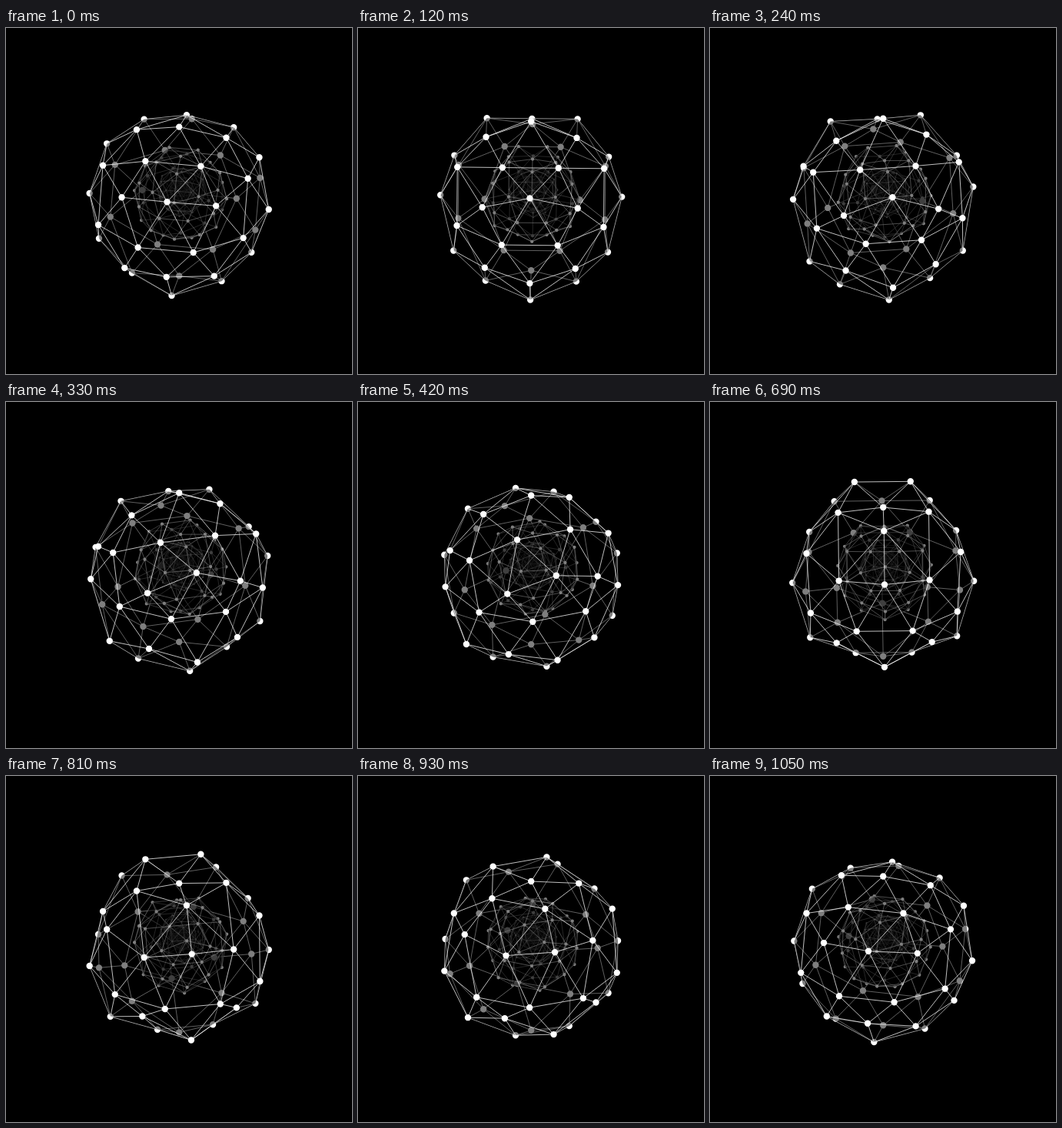
Recreate the animation shown at these times as an HTML page with a canvas. Size 450x450 px, loop 1.08 s.

```html
<!DOCTYPE html>
<html lang="en">
<head>
<meta charset="utf-8">
<title>Nested geodesic spheres</title>
<style>
  html, body { margin: 0; width: 100%; height: 100%; overflow: hidden; background: #000; }
  canvas { display: block; width: 450px; height: 450px; }
</style>
</head>
<body>
<canvas id="stage" width="450" height="450"></canvas>
<script>
const ctx = document.getElementById('stage').getContext('2d');
const LOOP = 1080, STEP = 30, LEVELS = 6, RATIO = 0.515;
const RADIUS = 118, TILT = 34.8 * Math.PI / 180;
const CENTER = { x: 225.2, y: 225.5 }, VANISH = { x: 229.1, y: 207.5 };
const FRONT_DEPTH = 0.1;
const rad = deg => deg * Math.PI / 180;

// Each ring: colatitude, first angle, vertex count, bob phase, bob height.
const rings = [
  [0, 63, 1, 180, 11],
  [31.72, 63, 5, 28, 11],
  [63.43, 63, 5, -24, 11],
  [58.28, 99, 5, 205, 11.5],
  [90, 81, 10, 180, 11],
  [121.72, 63, 5, 205, 11.5],
  [116.57, 99, 5, -24, 11],
  [148.28, 99, 5, 28, 11],
  [180, 99, 1, 180, 11]
];

const nodes = rings.flatMap(([colat, start, count, phase, bob]) =>
  Array.from({ length: count }, (_, i) => ({
    r: Math.sin(rad(colat)),
    h: Math.cos(rad(colat)),
    angle: rad(start + i * 360 / count),
    phase: rad(phase),
    bob
  })));

const position = n => [n.r * Math.cos(n.angle), n.h, n.r * Math.sin(n.angle)];
const base = nodes.map(position);
const near = (i, j) => Math.hypot(...base[i].map((v, k) => v - base[j][k])) < 0.7;

const edges = [], faces = [];
for (let i = 0; i < base.length; i++) {
  for (let j = i + 1; j < base.length; j++) {
    if (!near(i, j)) continue;
    edges.push([i, j]);
    for (let k = j + 1; k < base.length; k++) {
      if (near(i, k) && near(j, k)) faces.push(outward(i, j, k));
    }
  }
}

// Order the corners so that the normal points away from the center.
function outward(i, j, k) {
  const [a, b, c] = [base[i], base[j], base[k]];
  const det = a[0] * (b[1] * c[2] - b[2] * c[1])
            - a[1] * (b[0] * c[2] - b[2] * c[0])
            + a[2] * (b[0] * c[1] - b[1] * c[0]);
  return det > 0 ? [i, j, k] : [i, k, j];
}

function project(level, turn) {
  const scale = RATIO ** level;
  const cx = VANISH.x + (CENTER.x - VANISH.x) * scale;
  const cy = VANISH.y + (CENTER.y - VANISH.y) * scale;
  const sin = Math.sin(TILT), cos = Math.cos(TILT);
  return nodes.map(n => {
    const a = n.angle - turn * rad(72);
    const across = n.r * Math.cos(a), along = n.r * Math.sin(a);
    const shift = n.bob * Math.sin(turn * 2 * Math.PI + n.phase);
    return {
      x: cx + scale * RADIUS * across,
      y: cy + scale * (RADIUS * (along * sin - n.h * cos) + shift),
      depth: n.h * sin + along * cos
    };
  });
}

const facesViewer = (a, b, c) =>
  (b.x - a.x) * (c.y - a.y) - (b.y - a.y) * (c.x - a.x) < 0;

function drawMesh(links, dots, scale) {
  ctx.beginPath();
  for (const [a, b] of links) {
    ctx.moveTo(a.x, a.y);
    ctx.lineTo(b.x, b.y);
  }
  ctx.lineWidth = Math.max(0.8, scale);
  ctx.strokeStyle = 'rgba(255,255,255,0.75)';
  ctx.stroke();

  ctx.beginPath();
  for (const { x, y } of dots) {
    ctx.moveTo(x, y);
    ctx.arc(x, y, 4.2 * scale, 0, 2 * Math.PI);
  }
  ctx.fillStyle = '#fff';
  ctx.fill();
}

// The near side is a smoky shell that dims everything behind it.
function drawShell(points) {
  ctx.beginPath();
  for (const face of faces) {
    const [a, b, c] = face.map(i => points[i]);
    if (!facesViewer(a, b, c)) continue;
    ctx.moveTo(a.x, a.y);
    ctx.lineTo(b.x, b.y);
    ctx.lineTo(c.x, c.y);
    ctx.closePath();
  }
  ctx.fillStyle = 'rgba(0,0,0,0.5)';
  ctx.fill();
}

function drawSphere(level, turn) {
  if (level === LEVELS) return;
  const scale = RATIO ** level;
  const points = project(level, turn);
  const links = edges.map(([i, j]) => [points[i], points[j]]);
  const dotInFront = p => p.depth >= FRONT_DEPTH;
  const linkInFront = ([a, b]) => (a.depth + b.depth) / 2 >= FRONT_DEPTH;

  drawMesh(links.filter(l => !linkInFront(l)), points.filter(p => !dotInFront(p)), scale);
  drawSphere(level + 1, turn + 0.5);
  drawShell(points);
  drawMesh(links.filter(linkInFront), points.filter(dotInFront), scale);
}

const begin = performance.now();
function frame() {
  const time = Math.max(0, performance.now() - begin) % LOOP;
  ctx.fillStyle = '#000';
  ctx.fillRect(0, 0, 450, 450);
  drawSphere(0, Math.floor(time / STEP) * STEP / LOOP);
  requestAnimationFrame(frame);
}
frame();
</script>
</body>
</html>
```
